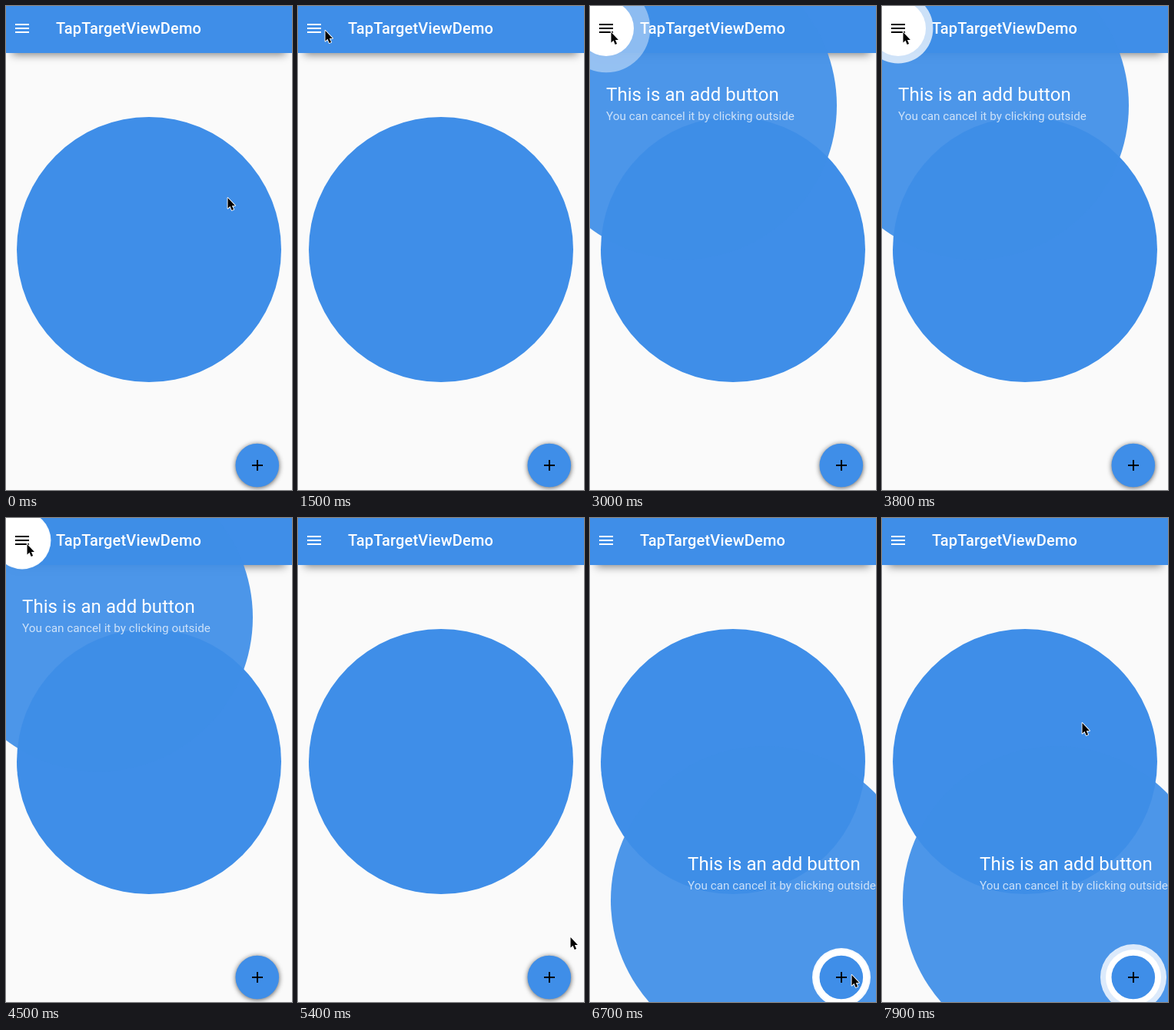
An HTML page that plays this animation: 372x628 px, repeating every 8000 ms.

```html
<!DOCTYPE html>
<html lang="en">
<head>
<meta charset="utf-8">
<title>Tap target demo</title>
<style>
  html, body { margin: 0; width: 100%; height: 100%; overflow: hidden; background: #fafafa; }
  svg { display: block; width: 372px; height: 628px; font-family: Roboto, sans-serif; fill: #fff; }
  .blue { fill: #3f8ee8; }
  .title { font-size: 20px; font-weight: 500; letter-spacing: .2px; }
  .heading { font-size: 24px; letter-spacing: .07px; }
  .detail { font-size: 15.3px; fill-opacity: .72; }
</style>
</head>
<body>
<svg viewBox="0 0 372 628">
  <defs>
    <filter id="wide" x="-20%" y="-60%" width="140%" height="220%"><feGaussianBlur stdDeviation="6"/></filter>
    <filter id="tight" x="-30%" y="-30%" width="160%" height="160%"><feGaussianBlur stdDeviation="3"/></filter>
  </defs>
  <rect width="372" height="628" fill="#fafafa"/>
  <circle class="blue" cx="186" cy="316" r="172"/>

  <rect x="8" y="14" width="356" height="49" fill-opacity=".5" style="fill:#000" filter="url(#wide)"/>
  <rect class="blue" width="372" height="61"/>
  <g id="menu">
    <circle class="blue" fill-opacity=".93"/><circle/><circle/>
    <g>
      <text class="heading" x="21" y="123">This is an add button</text>
      <text class="detail" x="21" y="148">You can cancel it by clicking outside</text>
    </g>
  </g>
  <path id="bars" d="M12 23h18v2h-18zm0 5h18v2h-18zm0 5h18v2h-18z"/>
  <text class="title" x="65" y="36">TapTargetViewDemo</text>

  <circle cx="327" cy="597" r="28.5" fill="#000" fill-opacity=".6" filter="url(#tight)"/>
  <g id="add">
    <circle class="blue" fill-opacity=".93"/><circle/><circle/>
    <g>
      <text class="heading" x="127" y="457">This is an add button</text>
      <text class="detail" x="127" y="482">You can cancel it by clicking outside</text>
    </g>
  </g>
  <circle class="blue" cx="326.8" cy="596" r="28.3"/>
  <path d="M320 596h14M327 589v14" stroke="#000" stroke-width="2"/>

  <path id="cursor" d="M0 0V13.5L3 10.8L5.2 16L7.6 15L5.4 9.9H9.4Z" fill="#000" stroke="#fff" stroke-width="1.8" stroke-linejoin="round" paint-order="stroke"/>
</svg>
<script>
const LOOP = 8000, STEP = 100;
const OPEN = 200, CLOSE = 150, PULSE = 1000;
const OUTER = 200, INNER = 36;
const $ = id => document.getElementById(id);
const clamp = v => Math.max(0, Math.min(1, v));
const smooth = v => v * v * (3 - 2 * v);

// dir: which way the large disc leans from the widget's centre
const targets = [
  { node: $('menu'), x: 21, y: 29, dir: 1, start: 1960, stop: 4600 },
  { node: $('add'), x: 327, y: 596, dir: -1, start: 6120, stop: Infinity },
];

// Pointer stops: time, x, y
const route = [
  [0, 288, 248], [200, 288, 248], [1300, 35, 31], [1500, 35, 31], [1800, 27, 33],
  [4650, 27, 33], [5400, 354, 543], [5900, 340, 592], [7100, 340, 592], [7900, 260, 265],
];

function setCircle(node, x, y, r, alpha = 1) {
  const attrs = { cx: x, cy: y, r, opacity: alpha };
  for (const key in attrs) node.setAttribute(key, attrs[key]);
}

function drawTarget({ node, x, y, dir, start, stop }, t) {
  const shown = t >= start && t < stop + CLOSE;
  node.style.display = shown ? '' : 'none';
  if (!shown) return false;

  const grow = 1 - (1 - clamp((t - start) / OPEN)) ** 3;
  const shrink = 1 - clamp((t - stop) / CLOSE) ** 3;
  const size = grow * shrink;
  const age = t - start - OPEN;
  const pulse = age > 0 ? (age % PULSE / PULSE) ** 3 : 0;
  const [disc, ripple, core, label] = node.children;
  const lean = dir * OUTER * size / 2;

  setCircle(disc, x + lean, y + lean, OUTER * size);
  setCircle(ripple, x, y, INNER * (1 + pulse) * size, 1 - pulse);
  setCircle(core, x, y, INNER * size);
  label.style.display = t < stop ? '' : 'none';
  return true;
}

function drawCursor(t) {
  const next = route.findIndex(stop => stop[0] > t);
  const [t0, x0, y0] = route[next < 0 ? route.length - 1 : next - 1];
  const [t1, x1, y1] = route[next < 0 ? route.length - 1 : next];
  const p = t1 > t0 ? smooth((t - t0) / (t1 - t0)) : 0;
  // half a pixel keeps the outline inside the pointer's box
  $('cursor').setAttribute('transform', `translate(${x0 + (x1 - x0) * p + .5} ${y0 + (y1 - y0) * p + 1})`);
}

const begin = performance.now();
function frame() {
  const t = Math.floor((performance.now() - begin) % LOOP / STEP) * STEP;
  const [menuOpen] = targets.map(target => drawTarget(target, t));
  $('bars').style.fill = menuOpen ? '#000' : '#fff';
  drawCursor(t);
  requestAnimationFrame(frame);
}
frame();
</script>
</body>
</html>
```
